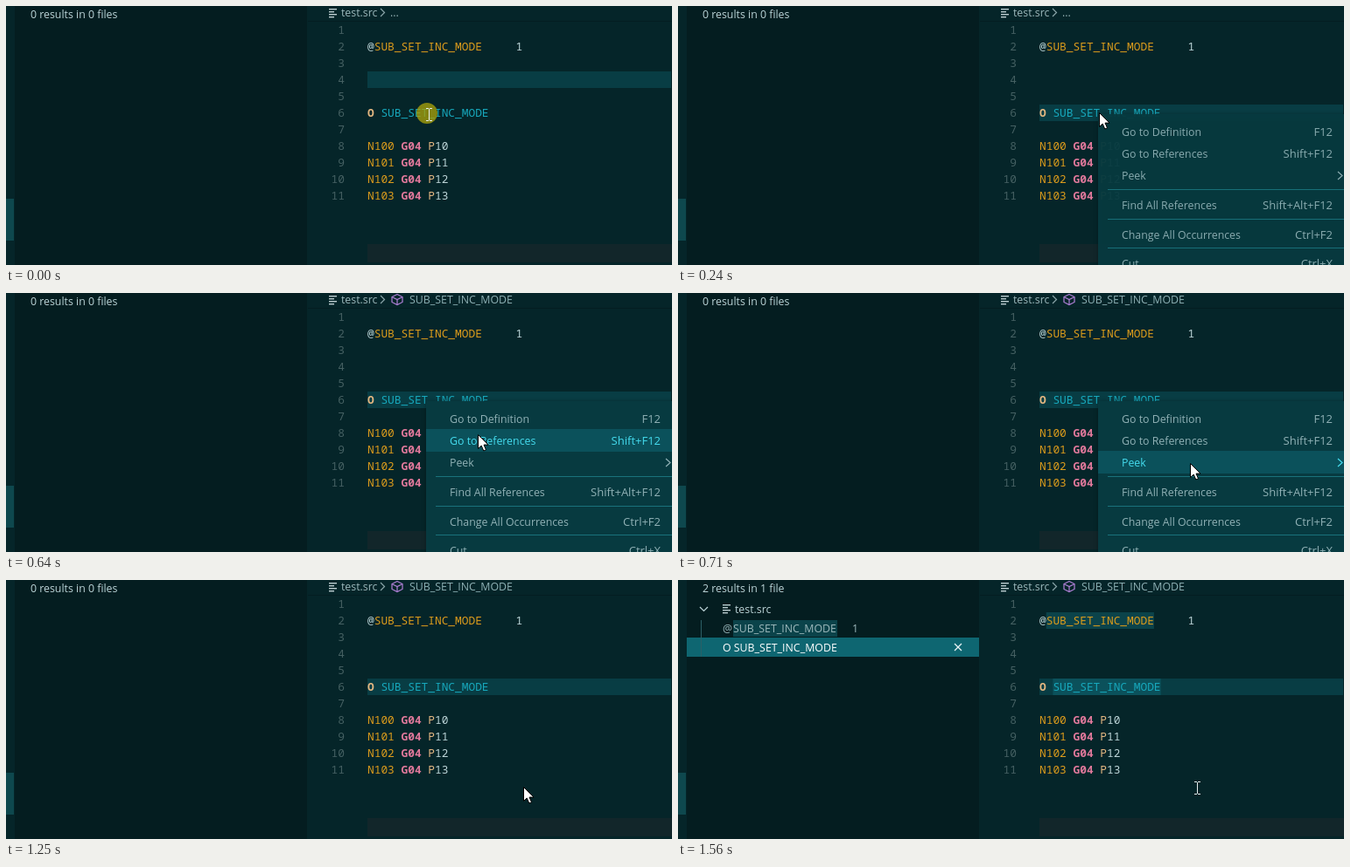
An HTML page with a canvas for the animation above (2.26 s loop, 761 by 297 pixels).

```html
<!DOCTYPE html>
<html>
<head>
<meta charset="utf-8">
<style>
html, body { margin: 0; width: 100%; height: 100%; overflow: hidden; background: #052529; }
canvas { display: block; }
</style>
</head>
<body>
<canvas id="stage" width="761" height="297"></canvas>
<script>
const c = document.getElementById('stage').getContext('2d');
const LOOP = 2260, CODE_X = 413, CHAR = 7.7, ROW = 19;
const SANS = '"Open Sans", "Noto Sans", sans-serif';
const UI = '12.35px ' + SANS, KEYS = '13px ' + SANS;
const MONO = '12.83px "Noto Sans Mono", "DejaVu Sans Mono", monospace';
const NAME = 'SUB_SET_INC_MODE';
const GOLD = '#dd9c1c', PINK = '#e2799c', PALE = '#bcd4d7', TAN = '#e4b781', TEAL = '#17a8bc';

// Pointer positions, each held until the next time
const path = [[170, 482, 123], [640, 540, 163], [710, 586, 196], [790, 589, 206], [870, 592, 226], [950, 592, 238]];

// label, shortcut, middle of the row
const items = [
  ['Go to Definition', 'F12', 144],
  ['Go to References', 'Shift+F12', 169],
  ['Peek', '', 194],
  ['Find All References', 'Shift+Alt+F12', 228],
  ['Change All Occurrences', 'Ctrl+F2', 262],
  ['Cut', 'Ctrl+X', 295]
];

function rect(x, y, w, h, color) {
  c.fillStyle = color;
  c.fillRect(x, y, w, h);
}

function text(s, x, y, color, font = UI, align = 'left') {
  c.font = font;
  c.textAlign = align;
  c.fillStyle = color;
  c.fillText(s, x, y);
}

function line(points, color, width = 1) {
  c.beginPath();
  points.forEach(([x, y]) => c.lineTo(x, y));
  c.strokeStyle = color;
  c.lineWidth = width;
  c.stroke();
}

const rowTop = n => 18 + ROW * (n - 1);

function code(row, col, s, color, weight = 500) {
  text(s, CODE_X + col * CHAR, rowTop(row) + 14, color, weight + ' ' + MONO);
}

function fileIcon(x, y) {
  [9, 6, 9, 6].forEach((w, i) => rect(x, y + i * 3, w, 1.4, '#bccdd0'));
}

function cube(x, y) {
  const p = '#b180d7';
  line([[x, y - 6], [x + 6, y - 3], [x + 6, y + 3], [x, y + 6], [x - 6, y + 3], [x - 6, y - 3], [x, y - 6]], p, 1.2);
  line([[x - 6, y - 3], [x, y], [x + 6, y - 3]], p, 1.2);
  line([[x, y], [x, y + 6]], p, 1.2);
}

function results(found) {
  if (!found) return text('0 results in 0 files', 28, 14, PALE);
  text('2 results in 1 file', 28, 14, PALE);
  line([[25, 31], [29.5, 35.5], [34, 31]], PALE, 1.2);
  fileIcon(51, 28);
  text('test.src', 65, 38, PALE);
  rect(63, 46, 119, 19, '#0b434a');
  text('@', 51, 60, '#9db8bb');
  text(NAME, 63, 60, '#9db8bb');
  text('1', 199, 60, '#9db8bb');
  rect(10, 66, 334, 22, '#0e6671');
  text('O ' + NAME, 51, 82, '#fff');
  line([[316, 73], [324, 81]], '#e6f2f3', 1.3);
  line([[324, 73], [316, 81]], '#e6f2f3', 1.3);
  rect(26, 46, 1, 42, '#2b5f66');
}

function breadcrumb(symbol) {
  rect(345, 17, 416, 1, '#041e22');
  fileIcon(369, 3);
  text('test.src', 383, 12, '#9db8bb');
  line([[428, 3], [432.5, 7.5], [428, 12]], '#8aa5a9', 1.2);
  if (symbol) {
    cube(447, 7.5);
    text(NAME, 461, 12, '#8fb0b4');
  } else text('...', 439, 12, '#9db8bb');
}

function editor(t) {
  rect(CODE_X, rowTop(t < 170 ? 4 : 6), 347, ROW, '#083d44');
  if (t >= 1410) {
    rect(CODE_X + CHAR, rowTop(2), 16 * CHAR, ROW, '#0b434a');
    rect(CODE_X + 2 * CHAR, rowTop(6), 16 * CHAR, ROW, '#0b515b');
  }
  rect(CODE_X, 273, 348, 21, '#12262a');
  for (let n = 1; n <= 11; n++) text(n, 387, rowTop(n) + 14, '#456062', MONO, 'right');
  code(2, 0, '@', PALE);
  code(2, 1, NAME, GOLD);
  code(2, 22, '1', PALE);
  code(6, 0, 'O', TAN, 'bold');
  code(6, 2, NAME, TEAL);
  for (let i = 0; i < 4; i++) {
    code(8 + i, 0, 'N10' + i, GOLD);
    code(8 + i, 5, 'G04', PINK, 'bold');
    code(8 + i, 9, 'P', TAN);
    code(8 + i, 10, '1' + i, PALE);
  }
}

function menu(alpha, pointerY) {
  c.save();
  c.globalAlpha = alpha;
  c.shadowColor = 'rgba(0,0,0,.3)';
  c.shadowBlur = 5;
  rect(480, 124, 300, 200, '#073a40');
  c.shadowColor = 'transparent';
  for (const y of [210, 244, 277]) rect(491, y, 270, 1, '#19727c');
  for (const [label, keys, y] of items) {
    const hot = pointerY > 124 && pointerY >= y - 13 && pointerY < y + 13;
    const color = hot ? '#45dcef' : '#91b2b6';
    if (hot) rect(480, y - 13, 281, 26, '#0b515b');
    text(label, 507, y + 5, color);
    text(keys, 748, y + 5, color, KEYS, 'right');
    if (!keys) line([[754, y - 4], [759, y + .5], [754, y + 5]], color, 1.2);
  }
  c.restore();
}

function arrow(x, y) {
  c.beginPath();
  [[0, 0], [0, 16], [3.7, 12.6], [6.3, 18.5], [9, 17.3], [6.5, 11.6], [11.5, 11.6]].forEach(([dx, dy]) => c.lineTo(x - .5 + dx, y - .5 + dy));
  c.closePath();
  c.fillStyle = '#fff';
  c.fill();
  c.strokeStyle = '#000';
  c.lineWidth = 1;
  c.stroke();
}

function beam(x, y) {
  rect(x, y - 6, 1, 13, '#e8eeee');
  for (const dy of [-7, 7]) {
    rect(x - 3, y + dy, 3, 1, '#e8eeee');
    rect(x + 1, y + dy, 3, 1, '#e8eeee');
  }
}

function draw(t) {
  rect(0, 0, 761, 297, '#052529');
  rect(10, 0, 334, 297, '#041d20');
  rect(0, 221, 9, 48, '#0e484e');
  if (t < 1410 || t >= 1560) results(t >= 1560);
  breadcrumb(t >= 320);
  editor(t);
  if (t < 170) {
    c.beginPath();
    c.arc(481, 123, 12, 0, 7);
    c.fillStyle = 'rgba(166,160,10,.78)';
    c.fill();
    beam(483, 124);
    return;
  }
  const [, x, y] = path.filter(p => p[0] <= t).pop();
  if (t < 1250) menu(t < 240 ? .18 : t < 320 ? .95 : 1, y);
  if (t >= 1330 && t < 1560) rect(481, rowTop(6), 2, ROW, '#d5f3f5');
  if (t < 1330) arrow(x, y);
  else beam(593, 238);
}

const start = performance.now();
function tick() {
  draw((performance.now() - start) % LOOP);
  requestAnimationFrame(tick);
}
tick();
</script>
</body>
</html>
```
